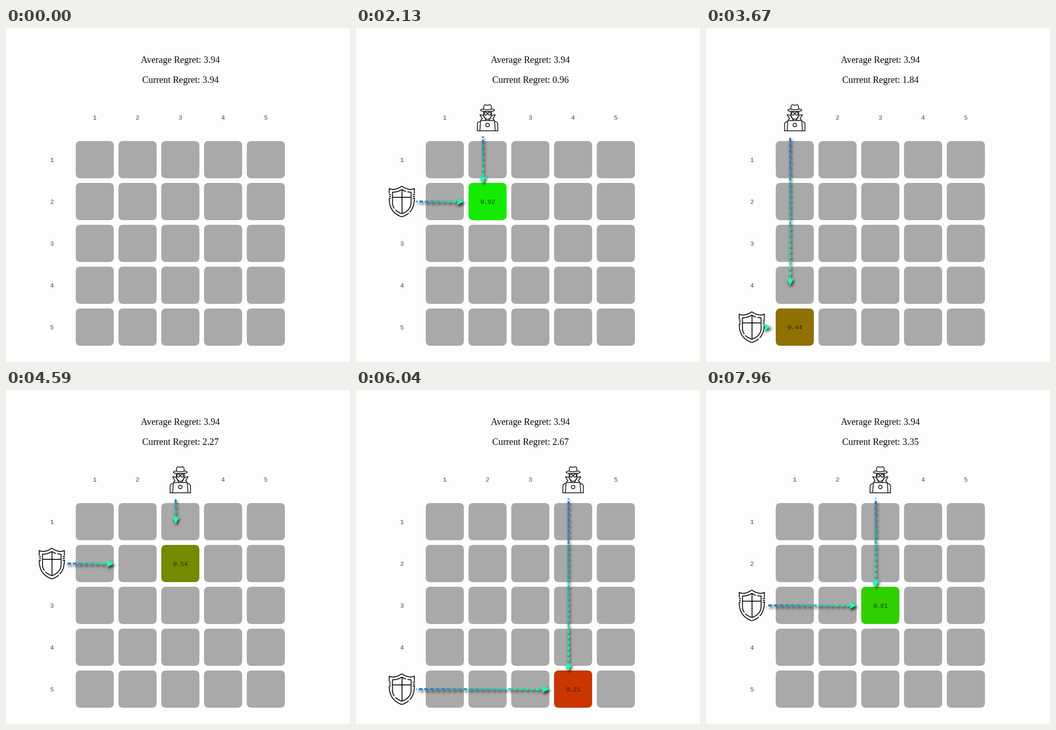
Recreate the animation shown at these times as a matplotlib script. Size 740 by 718 pixels, loop 8000 ms.

```python
import numpy as np
import matplotlib.pyplot as plt
from matplotlib.animation import FuncAnimation
from matplotlib.collections import LineCollection
from matplotlib.patches import Circle, FancyBboxPatch, PathPatch, Polygon
from matplotlib.path import Path
from matplotlib.transforms import Affine2D

W, H, DPI = 740, 718, 100
PX = 72 / DPI
LOOP, STEP = 8000, 40
BG, GREY, INK = "#fdfdfe", "#a9a9a9", "#0a0a04"

# row, column, payoff, regret after the round
ROUNDS = [(4, 5, 0.62, 0.49), (2, 2, 0.92, 0.96), (3, 5, 0.83, 1.41),
          (5, 1, 0.44, 1.84), (2, 3, 0.54, 2.27), (5, 4, 0.21, 2.67),
          (4, 2, 0.25, 3.02), (3, 3, 0.81, 3.35)]
FIRST, PERIOD = 274, 1016
DRAW = 500
START_REGRET = 3.94

TAIL = np.array([27, 118, 204]) / 255
TIP = np.array([30, 253, 170]) / 255
DASH, GAP, DASH_SPEED = 8, 4, 8
HEAD = np.array([(-8, -8), (8, 0), (-8, 8), (-5, 0)])

fig = plt.figure(figsize=(W / DPI, H / DPI), dpi=DPI, facecolor=BG)
ax = fig.add_axes([0, 0, 1, 1])


def col_x(c):
    return 99 + 92 * c


def row_y(r):
    return 193 + 90 * r


def label(x, y, text, font="Liberation Mono", size=13.33, alpha=0.75):
    return ax.text(x, y, text, family=font, fontsize=size * PX, color=INK,
                   alpha=alpha, ha="center", va="baseline", zorder=3)


def heading(y, text):
    return label(375, y, text, "Liberation Serif", 20, 1)


def parse(spec):
    """Turn 'M x y L x y Q ... C ...' into a Path."""
    codes = {"M": (Path.MOVETO, 1), "L": (Path.LINETO, 1),
             "Q": (Path.CURVE3, 2), "C": (Path.CURVE4, 3)}
    words, verts, out, i = spec.split(), [], [], 0
    while i < len(words):
        code, n = codes[words[i]]
        nums = [float(w) for w in words[i + 1:i + 1 + 2 * n]]
        verts += list(zip(nums[::2], nums[1::2]))
        out += [code] * n
        i += 1 + 2 * n
    return Path(verts, out)


class Icon:
    def __init__(self, width):
        self.shift = Affine2D()
        self.width = width
        self.parts = []

    def add(self, patch):
        patch.set(transform=self.shift + ax.transData, fill=False,
                  edgecolor=INK, linewidth=self.width * PX, zorder=4)
        patch.set_capstyle("butt")
        patch.set_joinstyle("round")
        ax.add_patch(patch)
        self.parts.append(patch)

    def line(self, spec, mirror=False):
        path = parse(spec)
        self.add(PathPatch(path))
        if mirror:
            self.add(PathPatch(path.transformed(Affine2D().scale(-1, 1))))

    def ring(self, x, y, r):
        self.add(Circle((x, y), r))

    def place(self, x, y):
        self.shift.clear().translate(x, y)

    def show(self, on):
        for p in self.parts:
            p.set_visible(on)


def make_shield():
    s = Icon(1.9)
    s.line("M -27 -17 L -27 -28 C -20 -24 -10 -26 0 -33", True)
    for y in (-15.5, -11.5, -7.5):
        s.line(f"M -28 {y} L -23.5 {y}", True)
    s.line("M -27 -6 C -27 14 -18 27 0 33")
    s.line("M 27 -6 C 27 7 23 17 17 23")
    s.line("M 15 25 Q 8 31 0 33")
    s.line("M 0 -26 Q -8 -20 -20 -20 L -20 3 Q -20 10 -16 15")
    s.line("M -14 18 Q -7 24 0 26")
    s.line("M 0 -26 Q 4 -23 9 -21.5")
    s.line("M 12 -20.8 L 20 -20 L 20 3 C 20 14 11 23 0 26")
    s.line("M 0 -26 L 0 26")
    s.line("M -20 -9 L 20 -9")
    return s


def make_spy():
    s = Icon(1.6)
    s.line("M -8.5 -18 L -8 -24 C -7.5 -28 -5 -28.5 -3 -27.5 Q 0 -26.5 3 "
           "-27.5 C 5 -28.5 7.5 -28 8 -24 L 8.5 -18")
    s.line("M -8.5 -19 C -17 -18 -17 -14.5 -9 -14 Q 0 -13 9 -14 "
           "C 17 -14.5 17 -18 8.5 -19")
    s.line("M -8.5 -18.5 Q 0 -16 8.5 -18.5")
    s.line("M -8.5 -13.5 L -8.5 -6 C -8 0 -4 3 0 3.5", True)
    s.ring(-4.2, -9, 3.2)
    s.ring(4.2, -9, 3.2)
    s.line("M -1 -9.5 L 1 -9.5")
    s.line("M -8.5 -5 L -16.5 -6.5 L -11.5 2 M -8 -4 L -3 6", True)
    s.line("M -11 1.5 L -14.5 5 M -16 8 Q -22 9 -22 14 L -22 27.5", True)
    s.line("M -16.5 27.5 L -15 6 L 15 6 L 16.5 27.5")
    s.line("M -22.8 27.5 L 22.8 27.5")
    s.ring(0, 15.5, 3.8)
    return s


U = np.arange(-24, 400) + 0.5
V = np.arange(-20, 20) + 0.5


def blur_matrix(n, sigma=3):
    d = np.subtract.outer(np.arange(n), np.arange(n))
    return np.exp(-d**2 / (2 * sigma**2)) / (sigma * np.sqrt(2 * np.pi))


BLUR_U, BLUR_V = blur_matrix(U.size), blur_matrix(V.size)


class Arrow:
    """Dashed arrow with a soft shadow, growing from a fixed start."""

    def __init__(self, vertical):
        self.vertical = vertical
        self.shadow = ax.imshow(np.zeros((2, 2, 4)), zorder=5, aspect="auto",
                                interpolation="nearest")
        self.dashes = LineCollection([], linewidths=4 * PX, zorder=6,
                                     capstyle="butt")
        ax.add_collection(self.dashes)
        self.head = ax.add_patch(Polygon(HEAD, facecolor=TIP, linewidth=0,
                                         zorder=7))

    def show(self, on):
        for a in (self.shadow, self.dashes, self.head):
            a.set_visible(on)

    def to_stage(self, pts, x, y):
        pts = np.asarray(pts, float)
        return (pts[..., ::-1] if self.vertical else pts) + (x, y)

    def draw(self, x, y, end, offset):
        starts = np.arange(offset - DASH - GAP, end, DASH + GAP)
        spans = [(max(a, 0), min(a + DASH, end)) for a in starts]
        spans = [(a, b) for a, b in spans if b > a]
        mids = [(a + b) / 2 / end for a, b in spans]
        self.dashes.set_segments(
            [self.to_stage([(a, 0), (b, 0)], x, y) for a, b in spans])
        self.dashes.set_color([TAIL + (TIP - TAIL) * m for m in mids])
        self.head.set_xy(self.to_stage(HEAD + (end, 0), x, y))
        self.draw_shadow(x + 2, y + 4, end, offset)

    def draw_shadow(self, x, y, end, offset):
        on = ((U - offset) % (DASH + GAP) < DASH) & (U > 0) & (U < end)
        side, r = np.abs(V)[:, None], (U - end)[None, :]
        head = ((np.abs(r) <= 8) & (side <= (8 - r) / 2)
                & (side >= (-5 - r) * 8 / 3))
        mask = ((side < 2) & on[None, :]) | head
        soft = BLUR_V @ mask.astype(float) @ BLUR_U
        if self.vertical:
            soft = soft.T
        rgba = np.zeros(soft.shape + (4,))
        rgba[..., 3] = np.clip(soft * 0.8, 0, 1)
        self.shadow.set_data(rgba)
        h, w = soft.shape
        left, top = (x - 20, y - 24) if self.vertical else (x - 24, y - 20)
        self.shadow.set_extent((left, left + w, top + h, top))


def ease(x):
    """Cubic bezier (0.58, 0, 0.42, 1)."""
    s = np.linspace(0, 1, 400)
    bx = 3 * (1 - s)**2 * s * 0.58 + 3 * (1 - s) * s**2 * 0.42 + s**3
    return float(np.interp(x, bx, 3 * (1 - s) * s**2 + s**3))


cells, row_labels, col_labels = {}, {}, {}
for k in range(1, 6):
    col_labels[k] = label(col_x(k) - 1, 197, str(k))
    row_labels[k] = label(98.5, row_y(k) + 4.5, str(k))
    for c in range(1, 6):
        cells[k, c] = ax.add_patch(FancyBboxPatch(
            (col_x(c) - 41, row_y(k) - 40), 82, 80, linewidth=0,
            boxstyle="round,pad=0,rounding_size=10", facecolor=GREY))

heading(75, f"Average Regret: {START_REGRET}")
regret = heading(118, "")
payoff = label(0, 0, "")
shield, spy = make_shield(), make_spy()
across, down = Arrow(False), Arrow(True)

ax.set_xlim(0, W)
ax.set_ylim(H, 0)
ax.axis("off")


def update(i):
    t = i * STEP + 30
    n = int((t - FIRST) // PERIOD)
    active = n >= 0
    row, col, value, total = ROUNDS[n] if active else (0, 0, 0, START_REGRET)

    for cell in cells.values():
        cell.set_facecolor(GREY)
    for k in range(1, 6):
        row_labels[k].set_visible(k != row)
        col_labels[k].set_visible(k != col)
    for part in (shield, spy, across, down):
        part.show(active)
    payoff.set_visible(active)
    regret.set_text(f"Current Regret: {total:.2f}")
    if not active:
        return []

    x, y = col_x(col), row_y(row)
    cells[row, col].set_facecolor((1 - value, value, 0))
    payoff.set_text(f"{value:.2f}")
    payoff.set_position((x, y + 4.5))
    shield.place(98.5, y)
    spy.place(x, 193)

    age = t - FIRST - n * PERIOD
    grown = ease(min(age / DRAW, 1))
    offset = DASH_SPEED * age / 1000
    across.draw(129.5, y, max((x - 188.5) * grown, 0.1), offset)
    down.draw(x - 10, 233, max((y - 280) * grown, 0.1), offset)
    return []


anim = FuncAnimation(fig, update, frames=LOOP // STEP, interval=STEP,
                     init_func=lambda: update(0), repeat=True, repeat_delay=0,
                     blit=False)
plt.show()
```
